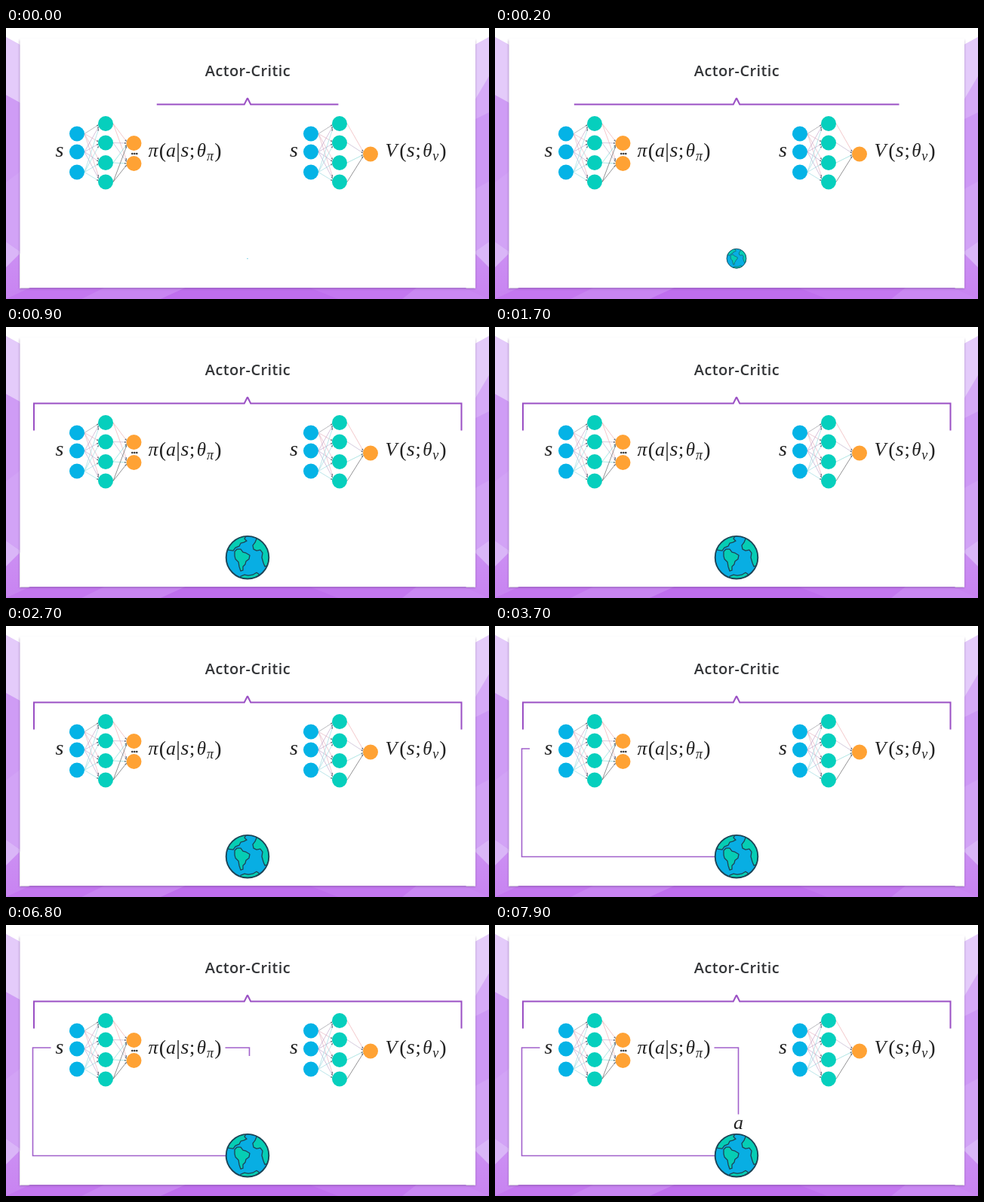
Recreate the animation shown at these times as an HTML page. Size 640 by 360 pixels, loop 8000 ms.

```html
<!DOCTYPE html>
<html lang="en">
<head>
<meta charset="utf-8">
<title>Actor-Critic</title>
<style>
  html, body { margin: 0; width: 100%; height: 100%; overflow: hidden; background: #fff; }
  svg { display: block; width: 100vw; height: 100vh; }
  .title { font: 600 20px "Open Sans", sans-serif; letter-spacing: .4px; fill: #333538; }
  .math text { font-family: "Liberation Serif", serif; text-anchor: middle; fill: #222; }
  .wire { fill: none; stroke: #a160cb; stroke-width: 1.6; stroke-dasharray: 100 120; }
  .brace { stroke: #9a4fc4; stroke-width: 2; }
  .land { fill: #06cdb4; stroke: #1d4456; stroke-width: 1.3; stroke-linejoin: round; }
</style>
</head>
<body>
<svg viewBox="0 0 640 360">
  <defs>
    <linearGradient id="side" x1="0" y1="0" x2="0" y2="1">
      <stop offset="0" stop-color="#ecdafb"/>
      <stop offset=".28" stop-color="#d9b2f7"/>
      <stop offset=".6" stop-color="#d09ff5"/>
      <stop offset="1" stop-color="#c883f1"/>
    </linearGradient>
    <filter id="soft" x="-5%" y="-5%" width="110%" height="112%">
      <feGaussianBlur stdDeviation="1.6"/>
    </filter>
    <clipPath id="disc"><circle r="28.5"/></clipPath>
  </defs>

  <g id="backdrop">
    <path fill="url(#side)" d="M0 12L18 22V346H622V22L640 12V360H0Z"/>
    <path fill="#e4cbfa" d="M0 12L20 23V100L0 89Z"/>
    <path fill="#cf9cf5" d="M0 89L20 100V190L0 205Z"/>
    <path fill="#d2a3f6" d="M0 205L20 190V298L0 284Z"/>
    <path fill="#dab6f8" d="M0 284L20 298L0 318Z"/>
    <path fill="#e4cbfa" d="M640 12L620 23V98L640 64Z"/>
    <path fill="#d6aaf7" d="M640 64L620 98V122L640 112Z"/>
    <path fill="#cd98f5" d="M640 112L620 122V215L640 204Z"/>
    <path fill="#d2a3f6" d="M640 204L620 215V298L640 284Z"/>
    <path fill="#dab6f8" d="M640 284L620 298L640 318Z"/>
    <path fill="#c477f0" d="M0 360L34 344H606L640 360Z"/>
    <path fill="#c985f2" d="M100 360L132 344H240L205 360Z"/>
    <path fill="#bf6eee" d="M205 360L240 344H400L440 360Z"/>
    <path fill="#ca88f3" d="M525 360L545 344H606L640 360Z"/>
  </g>
  <rect x="18" y="16" width="604" height="330.5" fill="#6b4a86" opacity=".45" filter="url(#soft)"/>
  <rect x="18.5" y="14" width="603.5" height="331" fill="#fff"/>

  <text class="title" x="263.8" y="64">Actor-Critic</text>
  <path id="braceL" class="wire brace" pathLength="100" d="M320 93L315.8 101.5H37V137.5"/>
  <path id="braceR" class="wire brace" pathLength="100" d="M320 93L324.2 101.5H603.5V137.5"/>
  <path id="stateWire" class="wire" pathLength="100" d="M292 306.5H35.5V163H59.5"/>
  <path id="actionWire" class="wire" pathLength="100" d="M290.5 163H322.5V251.5"/>

  <g id="nets"></g>
  <g id="math" class="math"></g>
  <g class="math"><text id="action" x="322.5" y="270.7" font-size="26" font-style="italic">a</text></g>

  <g id="globe">
    <circle r="28.5" fill="#08aee3"/>
    <g clip-path="url(#disc)" class="land">
      <path d="M-26 -10L-22 -24L-8 -31L-2 -28L-4 -25L-1 -22L-5 -20L-9 -19L-11 -15L-16 -13L-19 -9Z"/>
      <path d="M-17 -8L-14 -11L-9 -11L-6 -7L-2 -6L3 -3L2 2L-2 5L-3 9L-6 12L-6 17L-9 18L-11 12L-12 6L-16 2L-17 -2Z"/>
      <path d="M8 -30L12 -25L10 -20L7 -16L8 -11L12 -9L17 -10L20 -6L19 0L21 7L23 12L26 11L31 2L29 -14L22 -26Z"/>
      <path d="M-12 31L-9 25L-4 23L1 24L7 23L12 20L15 22L16 30Z"/>
    </g>
    <circle r="28.3" fill="none" stroke="#1d4456" stroke-width="1.9"/>
  </g>
</svg>

<script>
const LOOP = 8000;
const $ = id => document.getElementById(id);

function add(parent, tag, attrs, text) {
  const el = document.createElementNS("http://www.w3.org/2000/svg", tag);
  for (const k in attrs) el.setAttribute(k, attrs[k]);
  if (text) el.textContent = text;
  parent.append(el);
  return el;
}

// Networks: three inputs, four hidden nodes, any number of outputs
const INPUT_Y = [140.5, 164.5, 191.5];
const HIDDEN_Y = [127, 152.5, 179, 204.5];
const INPUT_INK = ["#e3a6b8", "#b99ac4", "#8fd6dc"];
const HIDDEN_INK = ["#eba3a8", "#b9a9c6", "#79d3d0", "#4a4a4e"];

function edge(x1, y1, x2, y2, ink) {
  const a = Math.atan2(y2 - y1, x2 - x1);
  const at = (d, s) => `${x2 - d * Math.cos(a) - s * Math.sin(a)} ${y2 - d * Math.sin(a) + s * Math.cos(a)}`;
  add($("nets"), "path", { d: `M${x1} ${y1}L${x2} ${y2}`, stroke: ink, "stroke-width": .6 });
  add($("nets"), "path", { d: `M${x2} ${y2}L${at(3, 1.1)}L${at(3, -1.1)}Z`, fill: "#6a7480" });
}

function net(x, outX, outs) {
  const hx = x + 38;
  INPUT_Y.forEach((y, i) => HIDDEN_Y.forEach((h, j) =>
    edge(x + 10, y, hx - 9, h + (y - h) * .1, i || j ? INPUT_INK[i] : "#8c8c94")));
  HIDDEN_Y.forEach((h, j) => outs.forEach(o =>
    edge(hx + 10, h, outX - 9.5, o + (h - o) * .07, HIDDEN_INK[j])));
  const dots = (cx, ys, fill) => ys.forEach(cy => add($("nets"), "circle", { cx, cy, r: 10, fill }));
  dots(x, INPUT_Y, "#04b3e6");
  dots(hx, HIDDEN_Y, "#06cfbd");
  dots(outX, outs, "#ffa234");
}

net(94, 169.5, [153, 180]);
net(404, 483, [167.5]);
[167.3, 170.3, 173.3].forEach(cx => add($("nets"), "circle", { cx, cy: 167, r: 1.3, fill: "#333" }));

// Formula glyphs: character, centre, size, baseline, upright
function glyphs(list) {
  for (const [ch, x, size = 26, y = 171.3, upright] of list)
    add($("math"), "text", { x, y, "font-size": size, "font-style": upright ? "normal" : "italic" }, ch);
}
const paren = (ch, x) => [ch, x, 28, 172.3, true];

glyphs([
  ["s", 71, 28],
  ["π", 195, 26], paren("(", 207.5), ["a", 218.5], ["|", 228, 28, 172.3, true],
  ["s", 237, 28], [";", 246.5, 26, 171.3, true], ["θ", 259, 25], ["π", 270.5, 18, 175.5], paren(")", 281),
  ["s", 381.5, 28],
  ["V", 510.5, 26], paren("(", 526), ["s", 536.2, 28], [";", 546, 26, 171.3, true],
  ["θ", 558.5, 25], ["v", 569.3, 18, 175.5], paren(")", 579)
]);

const clamp = v => Math.min(1, Math.max(0, v));
const ease = (t, start, dur) => (1 - Math.cos(Math.PI * clamp((t - start) / dur))) / 2;
const reveal = (id, p) => { $(id).style.strokeDashoffset = 100 * (1 - p); };

function draw(t) {
  const brace = ease(t, -450, 1055);
  reveal("braceL", brace);
  reveal("braceR", brace);
  reveal("stateWire", ease(t, 2815, 1000));
  reveal("actionWire", ease(t, 6410, 960));
  $("action").setAttribute("opacity", clamp((t - 7050) / 550));
  $("globe").setAttribute("transform", `translate(320 306.2) scale(${ease(t, -45, 520)})`);
}

const begin = performance.now();
function tick() {
  draw((performance.now() - begin) % LOOP);
  requestAnimationFrame(tick);
}
draw(0);
requestAnimationFrame(tick);
</script>
</body>
</html>
```
